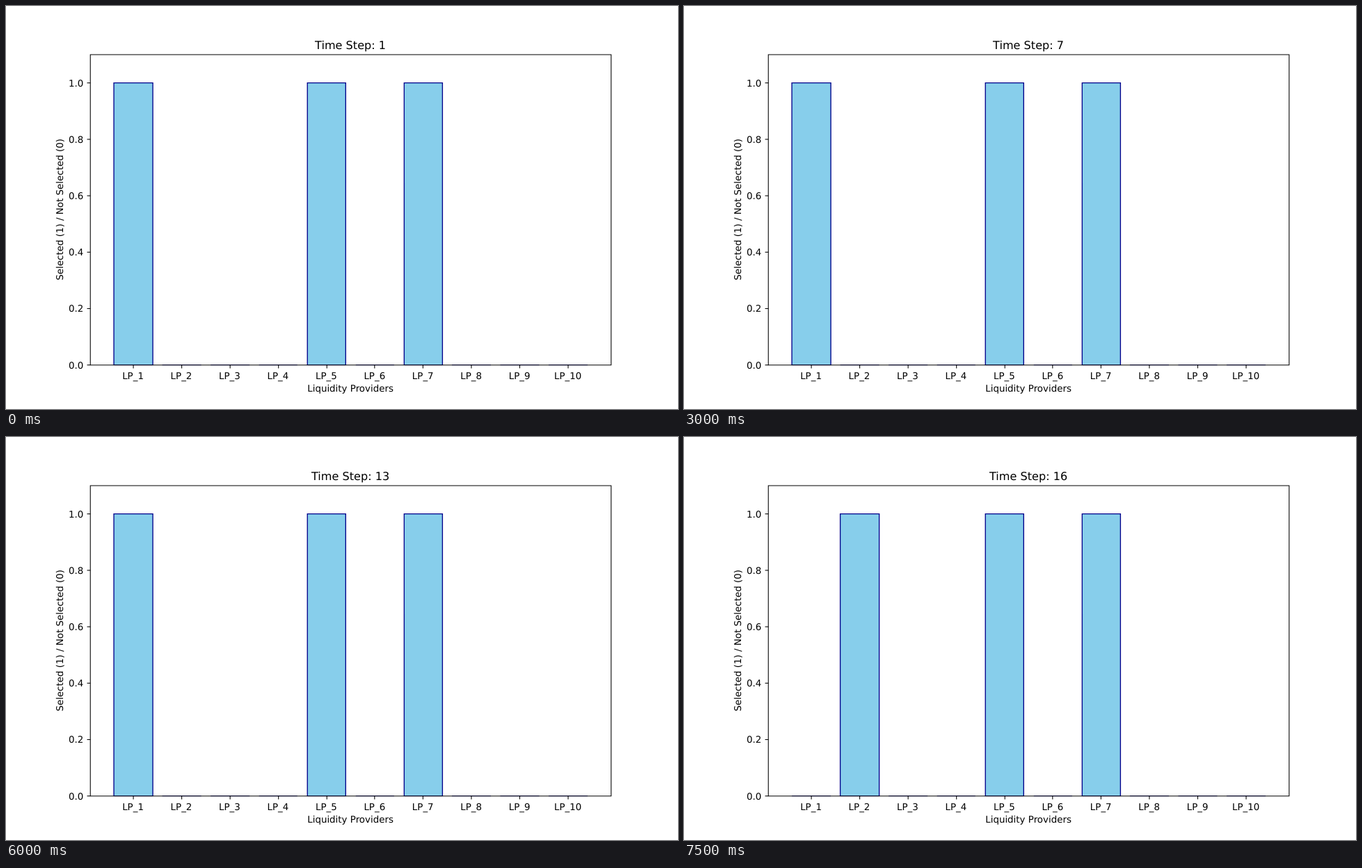
An HTML page for the animation above (8 s loop, 966 px wide and 580 px high).

```html
<!DOCTYPE html>
<html lang="en">
<head>
<meta charset="utf-8">
<title>Liquidity Providers</title>
<style>
  html, body { margin: 0; width: 100%; height: 100%; overflow: hidden; background: #fff; }
  svg { display: block; width: 966px; height: 580px; }
  text {
    font: 13.89px "DejaVu Sans", Verdana, sans-serif;
    text-anchor: middle;
    text-rendering: geometricPrecision;
  }
  #title { font-size: 16.67px; }
  .tick-y { text-anchor: end; }
  .axis { fill: none; stroke: #000; stroke-width: 1.11; }
  .bar { fill: skyblue; stroke: #00008b; stroke-width: 1.39; }
</style>
</head>
<body>
<svg viewBox="0 0 1000 600" preserveAspectRatio="none">
  <clipPath id="plot"><rect x="125" y="72" width="775" height="463"/></clipPath>
  <g id="bars" clip-path="url(#plot)"></g>
  <g id="axes"><path class="axis" d="M125.5 72.5H900.5V534.5H125.5Z"/></g>
  <text id="title" x="512.5" y="64"></text>
  <text x="512.5" y="574.5">Liquidity Providers</text>
  <text transform="translate(84.4 303) rotate(-90)">Selected (1) / Not Selected (0)</text>
</svg>
<script>
  const STEP_MS = 500, STEPS = 16, SWITCH_STEP = 15;
  const COUNT = 10, BASE = 534.5, UNIT = 775 / 10.78;
  const bars = document.getElementById('bars');
  const axes = document.getElementById('axes');
  const title = document.getElementById('title');

  const snap = v => Math.floor(v + 0.5) + 0.5;
  const xAt = i => 125 + (i + 0.89) * UNIT;

  function add(parent, tag, attrs, text = '') {
    const el = document.createElementNS('http://www.w3.org/2000/svg', tag);
    for (const key in attrs) el.setAttribute(key, attrs[key]);
    el.textContent = text;
    return parent.appendChild(el);
  }

  const barEls = [];
  for (let i = 0; i < COUNT; i++) {
    const x = xAt(i);
    barEls.push(add(bars, 'path', { class: 'bar' }));
    add(axes, 'path', { class: 'axis', d: `M${snap(x)} ${BASE}v4.86` });
    add(axes, 'text', { x, y: 555 }, `LP_${i + 1}`);
  }
  for (let i = 0; i <= 5; i++) {
    const y = BASE - 84 * i;
    add(axes, 'path', { class: 'axis', d: `M125.5 ${y}h-4.86` });
    add(axes, 'text', { class: 'tick-y', x: 115.3, y: y + 5.2 }, (i / 5).toFixed(1));
  }

  function show(step) {
    title.textContent = `Time Step: ${step}`;
    const selected = [step < SWITCH_STEP ? 1 : 2, 5, 7];
    barEls.forEach((el, i) => {
      const left = snap(xAt(i - 0.4)), right = snap(xAt(i + 0.4));
      const top = selected.includes(i + 1) ? BASE - 420 : BASE;
      el.setAttribute('d', `M${left} ${BASE}H${right}V${top}H${left}Z`);
    });
  }

  let shown = 0;
  function tick() {
    const step = Math.floor(performance.now() / STEP_MS) % STEPS + 1;
    if (step !== shown) show(shown = step);
    requestAnimationFrame(tick);
  }
  tick();
</script>
</body>
</html>
```
